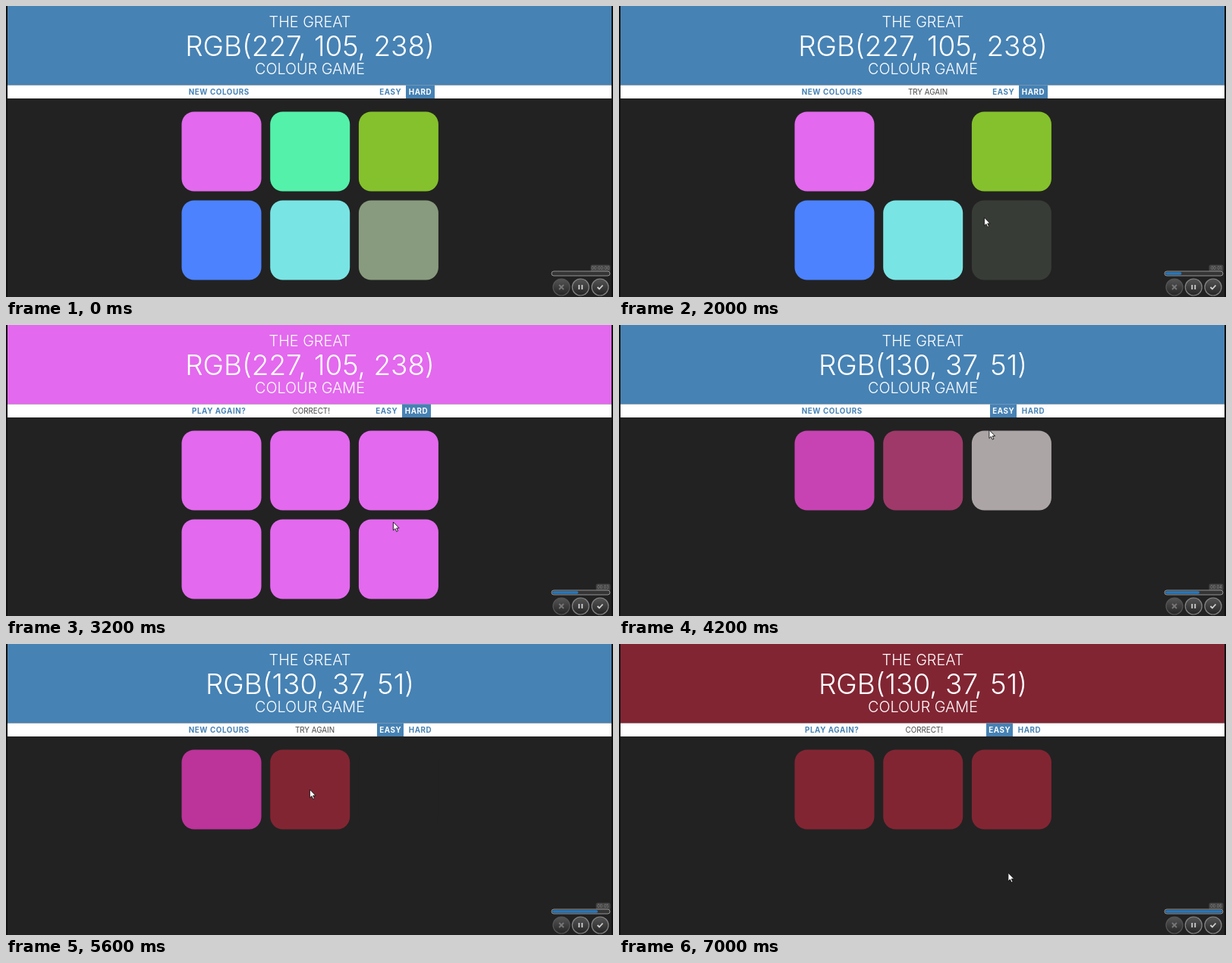
Recreate the animation shown at these times as an HTML page. Size 800 px wide and 384 px high, loop 7100 ms.

```html
<!DOCTYPE html>
<html lang="en">
<head>
<meta charset="utf-8">
<title>Colour Game</title>
<style>
  html, body { margin: 0; width: 100%; height: 100%; overflow: hidden; background: #222; }
  svg { display: block; width: 800px; height: 384px; }
  text { font-family: Inter, "Open Sans", sans-serif; text-anchor: middle; font-optical-sizing: none; }
  .head { fill: #fff; font-size: 19.8px; font-weight: 350; }
  #goal { font-size: 36.9px; }
  .nav { font-size: 9.8px; }
  .bold { font-weight: 700; letter-spacing: .6px; fill: #4682b4; }
  #msg { fill: #484848; }
  #clock { font-size: 5.5px; fill: #8a8a8a; }
</style>
</head>
<body>
<svg viewBox="0 0 800 384">
  <defs>
    <linearGradient id="knob" x2="0" y2="1">
      <stop stop-color="#555"/><stop offset="1" stop-color="#252525"/>
    </linearGradient>
  </defs>
  <rect width="800" height="384" fill="#222"/>
  <rect id="header" width="800" height="104.5"/>
  <rect y="104.5" width="800" height="17.5" fill="#fff"/>
  <text class="head" x="400.5" y="28">THE GREAT</text>
  <text class="head" id="goal" x="400.5" y="66"></text>
  <text class="head" x="400.5" y="90">COLOUR GAME</text>
  <text class="nav bold" id="reset" x="280.7" y="117"></text>
  <text class="nav" id="msg" y="117"></text>
  <g id="modes">
    <rect id="easyBox" x="489" y="104.5" width="35" height="17.5" fill="#4682b4"/>
    <rect id="hardBox" x="527" y="104.5" width="38" height="17.5" fill="#4682b4"/>
    <text class="nav bold" id="easy" x="506.7" y="117">EASY</text>
    <text class="nav bold" id="hard" x="546" y="117">HARD</text>
  </g>
  <g id="tiles"></g>
  <path d="M0 0h2v384H0zM798 0h2v384h-2z" fill="#111"/>
  <g id="recorder">
    <rect id="clockBox" y="342" height="8" rx="1.5" fill="#414141" stroke="#555" stroke-width=".6"/>
    <text id="clock" y="348.2"></text>
    <rect x="719" y="350" width="77" height="6" rx="3" fill="#353535" stroke="#929292"/>
    <rect id="bar" x="720" y="351.2" height="3.6" rx="1.8" fill="#2678bd"/>
    <g fill="url(#knob)" stroke="#858585" stroke-width="1.2">
      <circle cx="732" cy="371" r="11" stroke="#555"/>
      <circle cx="757.3" cy="371" r="11"/>
      <circle cx="783" cy="371" r="11"/>
    </g>
    <g fill="none" stroke="#d0d0d0" stroke-width="1.8">
      <path d="M729 368l6 6m0-6l-6 6" stroke="#777"/>
      <path d="M755.3 368v6m4-6v6"/>
      <path d="M779.5 371l2.5 2.5 4.5-5"/>
    </g>
  </g>
  <path id="cursor" d="M-.6 0v11l2.5-2.3 1.8 3.9 1.8-.9-1.8-3.7h3.5z" fill="#fff" stroke="#111" stroke-width=".9" stroke-linejoin="round"/>
</svg>
<script>
const LOOP = 7100, FADE = 600;
const BLUE = [70, 130, 180], DARK = [34, 34, 34], WHITE = [255, 255, 255];
const PINK = [227, 105, 238], WINE = [130, 37, 51];

// Moments at which each click takes effect
const WIN1 = 2550, EASY = 3950, WIN2 = 5750;
const MISS1 = 1150, MISS2 = 1710, MISS3 = 4800;

// Each tile: start colour, then [time, colour] changes
const TILES = [
  [PINK, [EASY, [188, 51, 154]], [WIN2, WINE]],
  [[84, 241, 170], [MISS1, DARK], [WIN1, PINK], [EASY, WINE]],
  [[133, 193, 44], [WIN1, PINK], [EASY, [147, 191, 134]], [MISS3, DARK], [WIN2, WINE]],
  [[76, 130, 254], [WIN1, PINK]],
  [[121, 228, 228], [WIN1, PINK]],
  [[136, 155, 126], [MISS2, DARK], [WIN1, PINK]]
];

// Cursor stops: time, x, y
const PATH = [
  [100, 757, 368], [650, 465, 189], [800, 465, 189], [1100, 425, 200], [1250, 425, 200],
  [1650, 482, 279], [2050, 482, 279], [2480, 300, 210], [2650, 300, 210],
  [3150, 511, 260], [3300, 511, 260], [3850, 503, 115], [4000, 503, 115],
  [4200, 488.5, 138.5], [4650, 505, 190], [4900, 505, 190], [5400, 401, 192],
  [6400, 401, 192], [7000, 513.5, 302]
];

const $ = id => document.getElementById(id);
const clamp = v => Math.max(0, Math.min(1, v));
const rgb = c => `rgb(${c.map(Math.round)})`;
const mix = (a, b, k) => a.map((v, i) => v + (b[i] - v) * k);
const set = (id, attrs) => Object.entries(attrs).forEach(([k, v]) => $(id).setAttribute(k, v));
const write = (id, s) => { if ($(id).textContent !== s) $(id).textContent = s; };

// The CSS "ease" curve, cubic-bezier(.25, .1, .25, 1)
function ease(p) {
  if (p <= 0 || p >= 1) return clamp(p);
  let lo = 0, hi = 1, s = .5;
  for (let i = 0; i < 16; i++) {
    s = (lo + hi) / 2;
    const x = .75 * s * (1 - s) + s ** 3;
    if (x < p) lo = s; else hi = s;
  }
  return .3 * s * (1 - s) ** 2 + 3 * s * s * (1 - s) + s ** 3;
}

const tiles = TILES.map((_, i) => {
  const r = document.createElementNS('http://www.w3.org/2000/svg', 'rect');
  const attrs = { x: 231.5 + i % 3 * 116.7, y: 139.5 + (i > 2 ? 117 : 0), width: 105, height: 105, rx: 16.5 };
  for (const k in attrs) r.setAttribute(k, attrs[k]);
  return $('tiles').appendChild(r);
});

const tileColour = ([start, ...steps], t) =>
  steps.reduce((c, [at, to]) => mix(c, to, ease((t - at) / FADE)), start);

function cursorAt(t) {
  let i = 0;
  while (i < PATH.length - 2 && t >= PATH[i + 1][0]) i++;
  const [t0, ...a] = PATH[i], [t1, ...b] = PATH[i + 1];
  const p = clamp((t - t0) / (t1 - t0));
  return mix(a, b, p * p * (3 - 2 * p));
}

function draw(t) {
  const easy = t >= EASY;
  const won = t >= WIN2 || t >= WIN1 && !easy;
  const missed = t >= (easy ? MISS3 : MISS1);

  set('header', { fill: rgb(won ? easy ? WINE : PINK : BLUE) });
  write('goal', easy ? 'RGB(130, 37, 51)' : 'RGB(227, 105, 238)');
  write('reset', won ? 'PLAY AGAIN?' : 'NEW COLOURS');
  write('msg', won ? 'CORRECT!' : missed ? 'TRY AGAIN' : '');
  set('msg', { x: won ? 402.3 : 407 });
  set('modes', { transform: `translate(${won ? -5 : 0})` });

  const k = ease((t - EASY) / 300);
  set('easyBox', { opacity: k });
  set('hardBox', { opacity: 1 - k });
  $('easy').style.fill = rgb(mix(BLUE, WHITE, k));
  $('hard').style.fill = rgb(mix(WHITE, BLUE, k));

  tiles.forEach((r, i) => {
    r.setAttribute('fill', rgb(tileColour(TILES[i], t)));
    r.setAttribute('visibility', easy && i > 2 ? 'hidden' : 'visible');
  });

  const fresh = t < 100;
  const secs = Math.floor(Math.max(0, t - 50) / 1000);
  write('clock', fresh ? '00:00:00' : '00:0' + secs);
  set('clock', { x: fresh ? 783.5 : 787 });
  set('clockBox', { x: fresh ? 771 : 778, width: fresh ? 25 : 18 });
  set('bar', { width: 75 * clamp(t / 7000) });

  set('cursor', {
    transform: `translate(${cursorAt(t)})`,
    visibility: fresh ? 'hidden' : 'visible'
  });
}

const begin = performance.now();
function tick() {
  const t = (performance.now() - begin) % LOOP;
  draw(Math.floor(t / 100) * 100);
  requestAnimationFrame(tick);
}
tick();
</script>
</body>
</html>
```
